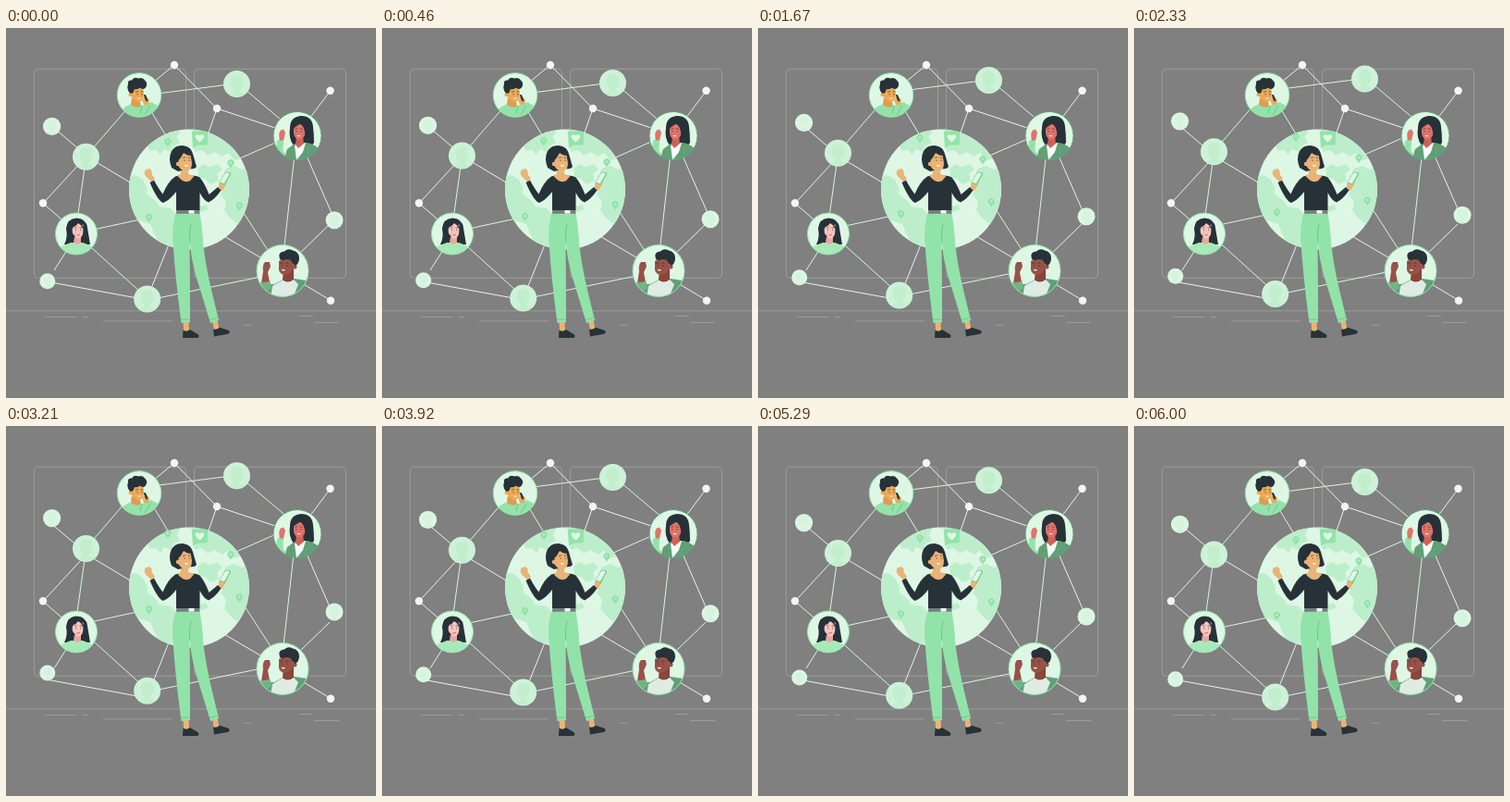
Animation of 400x400 px, one loop 6.04 s. Source, as an HTML page:

```html
<!DOCTYPE html>
<html lang="en">
<head>
<meta charset="utf-8">
<title>Connected people</title>
<style>
  html, body { margin: 0; width: 100%; height: 100%; overflow: hidden; background: #808080; }
  svg { display: block; width: 100vw; height: 100vh; }
  .line { fill: none; stroke-width: 1; }
  .white { stroke: #ebf0ed; }
  .mint { stroke: #d6f7df; }
  .faint { fill: none; stroke: #a3a3a3; stroke-width: .8; }
  .dark { fill: #263238; }
  .green { fill: #92e3a9; }
  .soft { fill: #a8e9ba; }
  .moss { fill: #619f75; }
  .pale { fill: #def7e5; }
  .land { fill: #bdeecb; }
  .tan { fill: #ebb376; }
  .ink { fill: none; stroke: #263238; stroke-width: .6; stroke-linecap: round; }
</style>
</head>
<body>
<svg viewBox="0 0 400 400">
  <defs>
    <clipPath id="globeClip"><circle cx="198" cy="174.5" r="65"/></clipPath>
    <clipPath id="callerClip"><circle cx="144" cy="72.5" r="23.8"/></clipPath>
    <clipPath id="waverClip"><circle cx="315" cy="116.5" r="26"/></clipPath>
    <clipPath id="listenerClip"><circle cx="76" cy="222.5" r="22.5"/></clipPath>
    <clipPath id="cheererClip"><circle cx="299" cy="262.5" r="28"/></clipPath>
  </defs>

  <g class="faint">
    <rect x="30.5" y="44.3" width="164" height="226" rx="4"/>
    <rect x="203.5" y="44.3" width="164" height="226" rx="4"/>
    <path d="M0 305.8H400M42 312.5H76M83 312.5H89M105 316.8H180M257 321.3H265M317 311.5H332M333 318.5H360"/>
  </g>

  <g id="fixedLines" class="line white"></g>
  <g id="movingLines" class="line mint bob"></g>
  <g id="dots" fill="#f4f4f4"></g>
  <g id="nodes" class="bob"></g>

  <!-- globe -->
  <circle class="pale" cx="198" cy="174.5" r="65"/>
  <g class="land" clip-path="url(#globeClip)">
    <path d="M152 124L163 115 176 110 188 111 185 118 188 124 181 127 178 134 171 131 167 137 162 132 155 133Z"/>
    <path d="M130 160L140 159 147 163 152 171 153 180 161 186 166 193 178 195 184 202 184 236 166 234 160 222 156 212 146 209 134 204Z"/>
    <path d="M200 109L222 113 241 126 254 141 247 143 240 135 233 139 226 134 218 138 212 132 204 134 202 122Z"/>
    <path d="M207 152L214 147 221 150 229 147 234 153 228 158 230 165 221 169 215 163 208 162Z"/>
    <path d="M238 152L247 149 255 153 265 150V180L258 206 249 211 242 205 236 197 238 188 232 180 237 172 233 164Z"/>
    <path d="M209 193L216 191 219 196 211 199Z"/>
  </g>
  <path class="green" d="M203.5 111.5H215.5Q218 111.5 218 114V124Q218 126.5 215.5 126.5H207L202 129.5 201 114Q201 111.5 203.5 111.5Z"/>
  <path class="pale" d="M209.5 123.8L205.5 119.6C203 116 207.5 113.5 209.5 116.8C211.5 113.5 216 116 213.5 119.6Z"/>
  <g id="pins" class="bob"></g>

  <!-- man on the phone -->
  <circle class="pale" cx="144" cy="72.5" r="23.8"/>
  <g clip-path="url(#callerClip)">
    <path class="green" d="M122 99L125 89Q129 84 136 82L147 84 157 80 166 85V99Z"/>
    <path fill="#df9b4f" d="M136 75L145 80 146 84Q142 88 135 83Z"/>
    <path fill="#eba958" d="M135 65Q140 61 148.5 65L149 73Q148 80.5 142.5 80L136 76Z"/>
    <circle fill="#eba958" cx="134.8" cy="72" r="2.3"/>
    <path class="dark" d="M133.5 70Q130 65 132 61Q131 56 136 56.5Q138 52.5 143 54.5Q148 53 150.5 57Q154 60 150.5 65Q147 67 145 64.5Q142 67 139 66Q138 70 136 71Z"/>
    <path class="ink" d="M140.5 69l2.2-.5M146 68.7l1.8.4M142 71.2v.8M146.8 71.2v.8"/>
    <path fill="#fff" d="M142 75.7L146 75.5Q144.5 78 142 75.7Z"/>
    <path fill="#eba958" d="M147.5 78Q149 74 152.5 74.5L155 78 154 83 149 83Z"/>
    <path class="dark" d="M148.7 72.5l2.2-.6 2.6 6.8-2 .8Z"/>
    <path class="line" stroke="#72c98b" stroke-width=".7" d="M147 84L145 92M156 84L150 94"/>
  </g>
  <circle class="line" stroke="#92e3a9" cx="144" cy="72.5" r="23.8"/>

  <!-- waving woman -->
  <circle class="pale" cx="315" cy="116.5" r="26"/>
  <g clip-path="url(#waverClip)">
    <path class="dark" d="M307 108Q307 96 319 95Q331 95 332 107Q333 115 333 124L329 129 311 127Q305 119 307 108Z"/>
    <path class="moss" d="M300 144L304 131 312 125 326 124Q334 126 340 132L337 144Z"/>
    <path fill="#f7fff9" d="M312 127L324 124 321 134 314 143Z"/>
    <path fill="#cf6058" d="M314 117L321 116 322 125 316 130 313 126Z"/>
    <path fill="#e0736a" d="M311 106Q317 101 324 107L323 116Q320 121.5 315 120.5Q311 118 311 112Z"/>
    <path class="dark" d="M309 110Q310 99 318 99Q327 101 326 117L323 114Q323 107 318 103.5Q314 106 309 110Z"/>
    <path class="ink" d="M312.7 109.4l2.2-.6M318 108.8l2.2.5M314 111.5v.8M319 111.5v.8"/>
    <path fill="#fff" d="M314.3 116.3L318.5 116Q316.5 118.5 314.3 116.3Z"/>
    <path fill="#e0736a" d="M295.5 119Q294.5 113 297 110.5L300 109.5 302 113 300 122 295.5 123Z"/>
    <path class="green" d="M293 121.5L300 121.5 299.5 133 303 137 299 140 292 134Z"/>
  </g>
  <circle class="line" stroke="#619f75" cx="315" cy="116.5" r="26"/>

  <!-- dark haired woman -->
  <circle class="pale" cx="76" cy="222.5" r="22.5"/>
  <g clip-path="url(#listenerClip)">
    <path class="dark" d="M65 217Q66 206 76 205.5Q87 206 88 216L91 234 63 234Q67 227 65 217Z"/>
    <path class="soft" d="M54 246L60 236 70 232 83 232 92 235.5 98 246Z"/>
    <path fill="#e9a7a0" d="M74 226H81V232Q77 235 73 232Z"/>
    <path fill="#f6c3bc" d="M71 213Q78 208 84 213L83 223Q80.5 229.5 76 227L72 222Z"/>
    <path class="dark" d="M70 220Q67 210 74 207.5Q82 207 85 218L83 217Q82 213 78 211Q76 214 73 215Z"/>
    <path class="ink" d="M74.5 216l1.8-.5M80 215.7l1.8.4M75.6 218v.8M80.8 218v.8"/>
    <path class="line" stroke="#d85d62" d="M76.5 223.6Q78.5 224.7 80 223.2"/>
  </g>
  <circle class="line" stroke="#92e3a9" cx="76" cy="222.5" r="22.5"/>

  <!-- cheering man -->
  <circle class="pale" cx="299" cy="262.5" r="28"/>
  <g clip-path="url(#cheererClip)">
    <path class="moss" d="M270 292L276 277 290 277 299 272 312 271 325 273 332 292Z"/>
    <path fill="#dfece4" d="M288 279L298 273 310 271 316 277 310 292H286Z"/>
    <path fill="#874639" d="M300 262L311 260 311 272Q304 277 299 272Z"/>
    <path fill="#985247" d="M295 252Q303 246 311 252L310 261Q306 268 299 266.5Q294 264 295 258Z"/>
    <circle fill="#985247" cx="312" cy="258" r="2.5"/>
    <path class="dark" d="M296 250Q293 242 301 241.5Q305 237.5 310 240.5Q317 242 317 249Q317 254 313 257L309.5 254Q309 250 303 250Q299 252 296 250Z"/>
    <path class="ink" d="M296.5 254.5l2.2-.5M302.5 254l2.4.4M298 256.8v.8M303.5 256.8v.8"/>
    <path fill="#fff" d="M297.5 261.2L302 261Q300 264 297.5 261.2Z"/>
    <path fill="#985247" d="M278 263Q277 256 280 253L285 253 286 258 283 264 285 275 276 276Z"/>
    <path fill="#72b487" d="M274 275.5L285.5 274 287 281 280 286Z"/>
  </g>
  <circle class="line" stroke="#92e3a9" cx="299" cy="262.5" r="28"/>

  <!-- presenter -->
  <path class="tan" d="M191.5 316H197.5L198 328H192ZM223 316L228.5 315 230.5 327 225 328Z"/>
  <path class="dark" d="M191.5 326.5Q195 329 199 326L208 331.5Q209.5 335 206 335H191Z"/>
  <path class="dark" d="M224 325.5Q228 326.5 231 323.8L241 327Q243 330 239 331L225 333.5Z"/>
  <path class="green" d="M183.5 200H209.5Q212.5 217 213.5 237Q217 262 222 283L230 316 221 319Q212 289 205 267Q200 249 198.5 231Q199 275 199 318L189.5 319Q183 270 180.5 232Q179 213 183.5 200Z"/>
  <path class="line" stroke="#70c98a" d="M198.5 231Q198 219 200 211M189 315H199M220 315.5L230 313"/>
  <path fill="#747f80" d="M184.3 196.5H209.5V200.8H184Z"/>
  <rect x="197.5" y="196.3" width="6" height="4.3" fill="#f5f5f5"/>
  <path class="tan" d="M157 166L151.5 161Q148.5 157 150.5 153.5L155 152Q158.5 154 157.5 158L161 163Z"/>
  <path class="tan" d="M229 176L230 170Q231 165 235 164L239 166 237 171 234 176Z"/>
  <path class="dark" d="M183 160.5Q187 159 190 159.5L199 159.5Q206 159 209.5 161.5Q215 168 219.5 180L229 172 232.5 175.5Q226 185 219 188.5Q214 187 209.5 178V197H184V177Q177 186 170 189Q164 187 155.5 167L160 164.5Q165 174 169.5 179.5Q175 166 183 160.5Z"/>
  <path class="tan" d="M188.5 149H197V158L203.5 159.5Q196 173 185 159.5L189 158Z"/>
  <path class="dark" d="M179 151Q175 141 179 133Q183 126.5 191 127Q200 128 202 136L206 150Q204 153 199 152L186 155Z"/>
  <path class="tan" d="M185.5 138Q192 133 199.5 137L201 146Q201 154.5 194.5 155Q188 154 185.5 147Z"/>
  <path class="dark" d="M183 148Q181 137 187 132Q195 128.5 201 138Q195 138 192 134.5Q190 140 186.5 143L186.5 149Z"/>
  <circle class="tan" cx="186" cy="147" r="2.2"/>
  <path class="ink" d="M191.5 140.5l2.3-.6M197 140l1.8.4M193 142.8v.9M198 142.7v.9"/>
  <path fill="#fff" d="M192.8 148.4L197.3 148.1Q195.5 151 192.8 148.4Z"/>
  <path fill="#72c98b" d="M237 155.5L243 156.5Q243.4 157 243 158L236.5 169.5 230 167.5Z"/>
  <path class="pale" d="M237.3 156.3L242 157.2 235.8 168.2 231 166.8Z"/>
</svg>
<script>
  const LOOP = 6040, LIFT = 7.2;
  const byId = id => document.getElementById(id);

  function add(parent, tag, attrs) {
    const el = document.createElementNS("http://www.w3.org/2000/svg", tag);
    for (const key in attrs) el.setAttribute(key, attrs[key]);
    parent.appendChild(el);
  }

  byId("fixedLines").innerHTML = `<path d="
    M182 40L160 58M182 40L228 87L217 119M228 87L300 111M350.5 68L328 98
    M53 109L80 132M40 189.5L82 144M40 189.5L66 212M95 143.5L140 170.5
    M52 262L66 240M46 274.5L142 292M158 279L178 229M234 224L280 251
    M320 276L351 294.5M324 136L351.5 199M350 212L314 247"/>`;

  byId("movingLines").innerHTML = `<path d="
    M160 71.4L240 61.2M258 66L304 105M155 87L175 120M132 86L94 130
    M85 151L77 208M92 218.5L150 206M88 233.5L146 286M164 292L280 268
    M247 143.5L298 121M312.5 132L300 244M255 197L286 245"/>`;

  const dots = [[182, 40], [228, 87], [350.5, 67.8], [40, 189.3], [351, 294.7]];
  for (const [cx, cy] of dots) add(byId("dots"), "circle", { cx, cy, r: 4.2 });

  const nodes = [
    [249.5, 60.6, 14.5], [86.5, 139.2, 14.5], [152.7, 293, 14.5],
    [49.6, 106.4, 9.6], [44.8, 273.8, 8.5], [355, 207.8, 9.5]
  ];
  for (const [cx, cy, r] of nodes) {
    const big = r > 10, k = r / 14.5;
    add(byId("nodes"), "circle", { cx, cy, r, fill: big ? "#cdf2d7" : "#dbf6e2" });
    add(byId("nodes"), "path", {
      transform: `translate(${cx} ${cy}) scale(${k})`,
      fill: big ? "#c3eece" : "#d5f3dd",
      d: "M-7-3Q-7-10 0-10Q7-10 7-3Q7 4 3 6V8L8 11Q0 16-8 11L-3 8V6Q-7 4-7-3Z"
    });
  }

  const pins = [[175, 123], [243, 146], [252.3, 192], [154.5, 204.7]];
  for (const [x, y] of pins) {
    const transform = `translate(${x} ${y})`;
    add(byId("pins"), "path", {
      transform, fill: "#92e3a9",
      d: "M0 5.5L-2.8 1.8A3.5 3.5 0 1 1 2.8 1.8Z"
    });
    add(byId("pins"), "circle", { transform, cy: -.4, r: 1.3, fill: "#bdeecb" });
  }

  // Everything floating shares one steady rise and fall.
  const floating = document.querySelectorAll(".bob");
  function draw(now) {
    const phase = now % LOOP / LOOP;
    const y = -LIFT * (1 - Math.abs(2 * phase - 1));
    floating.forEach(g => g.setAttribute("transform", `translate(0 ${y.toFixed(3)})`));
  }

  let start;
  function tick(now) {
    start ??= now;
    draw(now - start);
    requestAnimationFrame(tick);
  }
  draw(0);
  requestAnimationFrame(tick);
</script>
</body>
</html>
```
